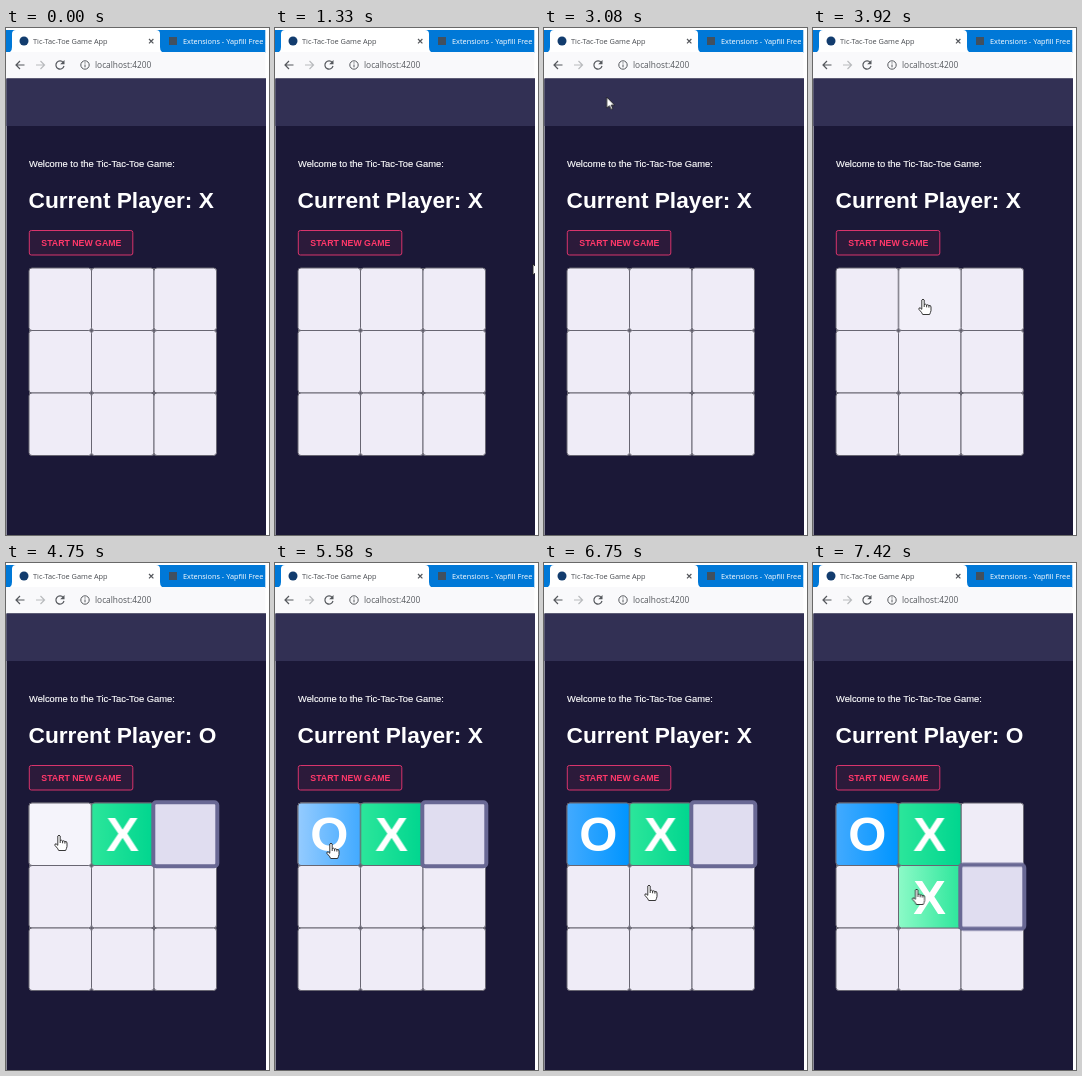
These frames come from a looping animation (263 px wide and 507 px high, 8000 ms). An HTML page:

```html
<!DOCTYPE html>
<html lang="en">
<head>
<meta charset="utf-8">
<title>Tic-Tac-Toe Game App</title>
<style>
  html, body { margin: 0; width: 100%; height: 100%; overflow: hidden; background: #fff; }
  svg { display: block; width: 263px; height: 507px; }
  text { font-family: "Liberation Sans", Arial, sans-serif; fill: #fff; }
  .chrome { font-family: "Open Sans", "Noto Sans", sans-serif; }
  .bold { font-weight: 700; }
  .mark { font-weight: 700; font-size: 49px; text-anchor: middle; }
  .icon { fill: none; stroke: #55585d; stroke-width: 1.2; }

  .step, .fade, .move { animation: 8s infinite; }
  .step { animation-timing-function: step-end; }
  .fade { animation-timing-function: linear; }
  .move { animation-timing-function: ease-in-out; }

  .turn-x { animation-name: turn-x; }
  .turn-o { animation-name: turn-o; }
  .x1 { animation-name: x1; }
  .o1 { animation-name: o1; }
  .x2 { animation-name: x2; }
  .lit-x1 { animation-name: lit-x1; }
  .lit-o1 { animation-name: lit-o1; }
  .over1 { animation-name: over1; }
  .over2 { animation-name: over2; }
  .over-start { animation-name: over-start; }
  .over-reload { animation-name: over-reload; }
  .focus3 { animation-name: focus3; }
  .focus6 { animation-name: focus6; }
  .arrow { animation-name: arrow; }
  .hand { animation-name: hand; }
  .cursor { animation-name: cursor; }

  @keyframes turn-x { 0%, 65.6% { opacity: 1 } 50%, 90.6%, 100% { opacity: 0 } }
  @keyframes turn-o { 0%, 65.6% { opacity: 0 } 50%, 90.6%, 100% { opacity: 1 } }
  @keyframes x1 { 0%, 49.9% { opacity: 0 } 51%, 100% { opacity: 1 } }
  @keyframes o1 { 0%, 65.5% { opacity: 0 } 67%, 100% { opacity: 1 } }
  @keyframes x2 { 0%, 90.5% { opacity: 0 } 92%, 100% { opacity: 1 } }
  @keyframes lit-x1 { 0%, 55.8% { opacity: 1 } 57.8%, 100% { opacity: 0 } }
  @keyframes lit-o1 { 0%, 82% { opacity: 1 } 84%, 100% { opacity: 0 } }
  @keyframes over1 { 0%, 56% { opacity: 0 } 57.5%, 82% { opacity: 1 } 84%, 100% { opacity: 0 } }
  @keyframes over2 { 0%, 41.4% { opacity: 0 } 43%, 56% { opacity: 1 } 58%, 100% { opacity: 0 } }
  @keyframes over-start { 0%, 40.4% { opacity: 0 } 41%, 41.3% { opacity: 1 } 42.5%, 100% { opacity: 0 } }
  @keyframes over-reload { 0%, 37.8%, 100% { opacity: 0 } 23.4% { opacity: 1 } }
  @keyframes focus3 { 0%, 90.6%, 100% { opacity: 0 } 50% { opacity: 1 } }
  @keyframes focus6 { 0% { opacity: 0 } 90.6%, 100% { opacity: 1 } }
  @keyframes arrow { 0%, 40.6%, 100% { opacity: 0 } 16.6% { opacity: 1 } }
  @keyframes hand { 0% { opacity: 0 } 40.6%, 100% { opacity: 1 } }
  @keyframes cursor {
    0%, 16.6% { transform: translate(258px, 236px) }
    24%, 27% { transform: translate(56px, 37px) }
    29.1%, 37% { transform: translate(55px, 36px) }
    42.8%, 53% { transform: translate(110px, 271px) }
    59.4%, 64.6% { transform: translate(53px, 272px) }
    69.7%, 80.2% { transform: translate(56px, 280px) }
    84.4%, 86% { transform: translate(105px, 322px) }
    89.6%, 100% { transform: translate(103.6px, 326px) }
  }
</style>
</head>
<body>
<svg viewBox="0 0 263 507">
  <defs>
    <linearGradient id="green"><stop stop-color="#2ce69b"/><stop offset="1" stop-color="#00d68f"/></linearGradient>
    <linearGradient id="green-lit"><stop stop-color="#8cfac7"/><stop offset="1" stop-color="#2ce69b"/></linearGradient>
    <linearGradient id="blue"><stop stop-color="#42aaff"/><stop offset="1" stop-color="#0095ff"/></linearGradient>
    <linearGradient id="blue-lit"><stop stop-color="#94cbff"/><stop offset="1" stop-color="#42aaff"/></linearGradient>
    <clipPath id="view"><rect width="259.3" height="507"/></clipPath>
    <rect id="box" width="62.5" height="62.5" rx="3"/>
    <use id="cell" href="#box" fill="#efecf7" stroke="#686672"/>
    <g id="row">
      <use href="#cell"/><use href="#cell" x="62.5"/><use href="#cell" x="125"/>
    </g>
    <rect id="ring" x="-.7" y="-.7" width="64" height="64" rx="3" fill="#e0ddf0" stroke="#696894" stroke-width="4"/>
  </defs>

  <g clip-path="url(#view)">
    <!-- browser bar -->
    <rect y="2" width="260" height="23" fill="#0078d7"/>
    <path d="M0 25Q6 25 6 19V6Q6 2 10 2H150Q154 2 154 6V19Q154 25 160 25Z" fill="#fff"/>
    <rect y="24" width="260" height="27" fill="#f9f9fb"/>
    <circle cx="18" cy="13" r="4.5" fill="#123c6e"/>
    <text class="chrome" x="27" y="15.7" font-size="7.35" style="fill:#4a4d52">Tic-Tac-Toe Game App</text>
    <path class="icon" d="M143 11l4.4 4.4m0-4.4l-4.4 4.4"/>
    <rect x="163" y="9" width="8" height="8" fill="#41505f"/>
    <text class="chrome" x="177" y="15.7" font-size="7.35">Extensions - Yapfill Free Add</text>

    <path class="icon" d="M18.5 37H10m4-4l-4 4 4 4"/>
    <path class="icon" d="M30 37h8.5m-4-4l4 4-4 4" style="stroke:#b9bbbe"/>
    <circle class="step over-reload" cx="54" cy="37" r="9" fill="#dfe0e3"/>
    <path class="icon" d="M57.3 34.5A4.1 4.1 0 1 0 58 38"/>
    <path d="M58.5 32v4.3h-4.3z" fill="#55585d"/>
    <g class="icon" style="stroke-width:1">
      <circle cx="79" cy="37" r="4.2"/>
      <path d="M79 36.5v2.8m0-4.9v1.1"/>
    </g>
    <text class="chrome" x="89" y="40" font-size="8.35" style="fill:#55585d">localhost:4200</text>

    <!-- page -->
    <rect x=".5" y="50.5" width="260" height="457" fill="#1b1837"/>
    <rect x=".5" y="50.5" width="260" height="47.5" fill="#323054"/>
    <text x="23" y="139" font-size="9.35" stroke="#fff" stroke-width=".15">Welcome to the Tic-Tac-Toe Game:</text>
    <g class="bold" font-size="22.7">
      <text class="step turn-x" x="22.5" y="179.6">Current Player: X</text>
      <text class="step turn-o" x="22.5" y="179.6">Current Player: O</text>
    </g>
    <rect x="23.3" y="202.5" width="103.5" height="24.5" rx="2" fill="#ff386a" fill-opacity=".08" stroke="#d8346c"/>
    <rect class="fade over-start" x="23.3" y="202.5" width="103.5" height="24.5" rx="2" fill="#ff386a" fill-opacity=".15"/>
    <text class="bold" x="35.3" y="218" font-size="8.75" style="fill:#ff386a">START NEW GAME</text>

    <!-- board -->
    <g transform="translate(23 240)">
      <rect width="187.5" height="187.5" rx="3" fill="#5f5d6b"/>
      <use href="#row"/><use href="#row" y="62.5"/><use href="#row" y="125"/>
      <g fill="#f5f4fb" stroke="#686672">
        <use class="fade over1" href="#box"/>
        <use class="fade over2" href="#box" x="62.5" fill="#f2f0f9"/>
      </g>
      <g class="fade o1" stroke="#686672">
        <use href="#box" fill="url(#blue)"/>
        <use class="fade lit-o1" href="#box" fill="url(#blue-lit)"/>
        <text class="mark" x="31.2" y="48" stroke="none">O</text>
      </g>
      <g class="fade x1" transform="translate(62.5 0)" stroke="#686672">
        <use href="#box" fill="url(#green)"/>
        <use class="fade lit-x1" href="#box" fill="url(#green-lit)"/>
        <text class="mark" x="31.2" y="48" stroke="none">X</text>
      </g>
      <g class="fade x2" transform="translate(62.5 62.5)" stroke="#686672">
        <use href="#box" fill="url(#green-lit)"/>
        <text class="mark" x="31.2" y="48" stroke="none">X</text>
      </g>
      <use class="step focus3" href="#ring" x="125"/>
      <use class="step focus6" href="#ring" x="125" y="62.5"/>
    </g>

    <g class="move cursor" stroke="#222" stroke-width=".9" stroke-linejoin="round" fill="#fff">
      <path class="step arrow" d="M0 0V11L2.6 8.7 4.3 12.4 6 11.6 4.4 8H7.8Z"/>
      <path class="step hand" d="M-1.2 1Q0 -.7 1.2 1V5.5Q2.5 4.6 3.6 6 4.8 5.2 5.9 6.6 8 6 8 8V11.5Q7.6 13.5 6.6 15.5H-.3Q-1 13.5 -4 10.5 -4.6 8.6 -2.9 8.8L-1.2 10.3ZM1.2 5.5V8M3.6 6V8.3M5.9 6.6V8.6"/>
    </g>
  </g>
</svg>
</body>
</html>
```
